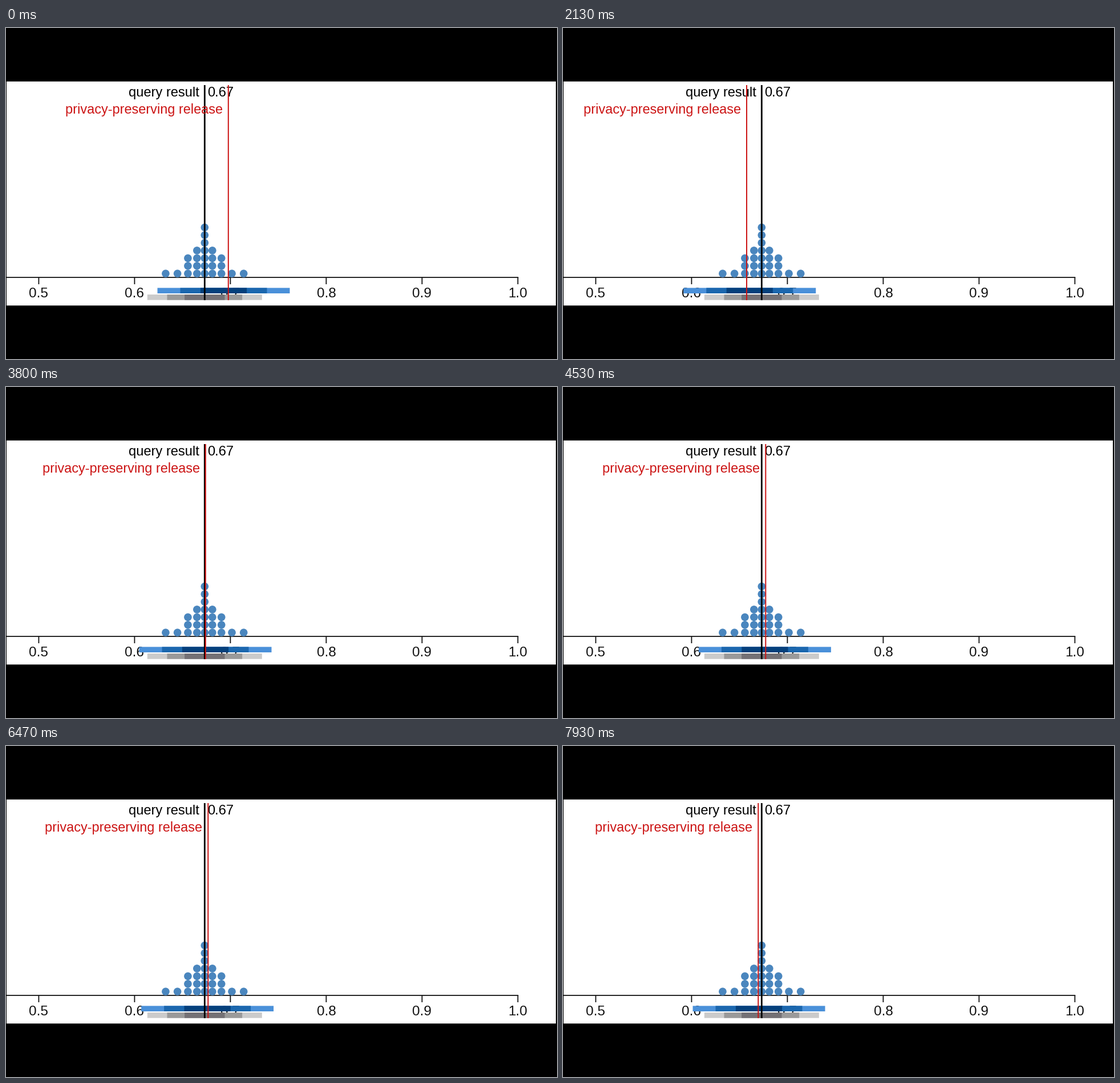
A matplotlib script for the animation above (8 s loop, 966 px wide and 580 px high).

```python
import matplotlib.pyplot as plt
from matplotlib.animation import FuncAnimation
from matplotlib.patches import Circle, Rectangle

W, H, DPI = 966, 580, 100
FRAMES, LOOP_MS = 120, 8000
PT = 72 / DPI  # points per pixel

FIRST, HOLD = 13, 6  # ticks until the first new draw, then between draws
RESULT = 348.3       # position of the true answer
PULL, SPREAD = 0.8, 116

RED = "#cc1414"
BLUES = ("#4a90d9", "#1b67ae", "#04407c")
GREYS = ("#cbcbcb", "#9a9a9a", "#747175")
NESTED = (1, 0.655, 0.35)  # band half-widths, outside in

# Position of the noisy release in each draw
RELEASES = (389.8, 281, 343.5, 334, 322, 450, 316.2, 280, 349.8, 389,
            355.3, 368, 373, 346.2, 358, 354.3, 329.3, 340.5, 342.3)

plt.rcParams["font.family"] = "Liberation Sans"
fig = plt.figure(figsize=(W / DPI, H / DPI), dpi=DPI, facecolor="black")
ax = fig.add_axes([0, 0, 1, 1])
ax.set(xlim=(0, W), ylim=(H, 0))
ax.axis("off")


def rect(x, y, w, h, color, z):
    return ax.add_patch(Rectangle((x, y), w, h, fc=color, lw=0, zorder=z,
                                  snap=False))


def label(x, y, s, size, z, color="black", ha="center"):
    return ax.text(x, y, s, fontsize=size * PT, color=color, ha=ha,
                   va="baseline", zorder=z)


def strip(y, colors):
    return [rect(0, y, 0, 9.6, c, 4 + i / 10) for i, c in enumerate(colors)]


def place(bars, center, half):
    for bar, share in zip(bars, NESTED):
        bar.set_x(center - half * share)
        bar.set_width(2 * half * share)


panel = rect(1, 93.7, 963, 392.6, "white", 1)

# Axis
rect(1, 436.1, 897.3, 1.8, "#111111", 2)
for i in range(6):
    x = 57.4 + 168 * i
    rect(x - 0.9, 437, 1.8, 12, "#111111", 2)
    label(x, 472, f"{0.5 + i / 10:.1f}", 24.3, 2, "#111111")

# Quantile dots: mirrored columns that drift apart away from the middle
for k, count in enumerate((7, 4, 3, 1, 1)):
    offset = k * (12.3 + 1.2 * k)
    for x in {RESULT - offset, RESULT + offset}:
        for row in range(count):
            ax.add_patch(Circle((x, 430.3 - 13.47 * row), 6.8, fc="#4a86be",
                                lw=0, zorder=3))

# Interval strips
blue = strip(455.4, BLUES)
grey = strip(467, GREYS)
place(grey, RESULT, 100.5)

# Query result and its noisy release
rect(RESULT - 1.4, 100, 2.8, 377, "black", 5)
label(338.5, 120, "query result", 23.7, 5, ha="right")
label(353, 120, "0.67", 23.7, 5, ha="left")
release = rect(0, 100, 2, 377, RED, 6)
caption = label(0, 150, "privacy-preserving release", 23.5, 6, RED, "right")
caption.set_clip_path(panel)


def update(tick):
    draw = max(0, 1 + (tick - FIRST) // HOLD)
    x = RELEASES[draw]
    release.set_x(x - 1)
    caption.set_x(x - 10)
    place(blue, RESULT + PULL * (x - RESULT), SPREAD)
    return [release, caption, *blue]


anim = FuncAnimation(fig, update, frames=FRAMES, interval=LOOP_MS / FRAMES,
                     repeat=True, repeat_delay=0, blit=False)
plt.show()
```
